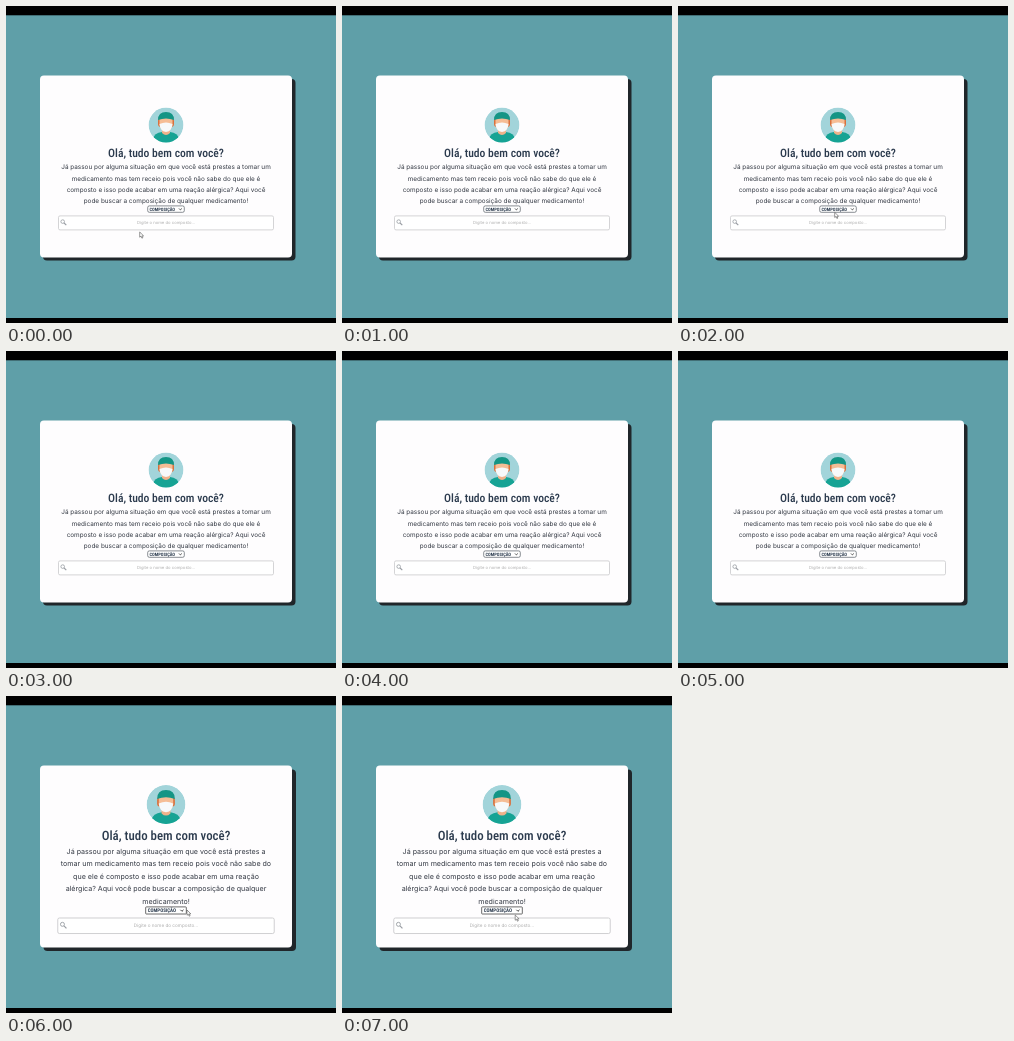
Animation, 330 px wide and 317 px high, one loop 8000 ms. Source, as an HTML page:

```html
<!DOCTYPE html>
<html lang="pt-BR">
<head>
<meta charset="utf-8">
<style>
  html, body { margin: 0; width: 100%; height: 100%; overflow: hidden; background: #000; }
  svg { display: block; width: 100vw; height: 100vh; }
  text { text-anchor: middle; text-rendering: geometricPrecision; font-family: Inter, sans-serif; }
  .title, .choice { font-family: "Roboto Condensed", Roboto, sans-serif; font-stretch: 75%; fill: #2c3b4e; }
  .title { font-size: 11.6px; font-weight: 500; }
  .choice { font-size: 4.5px; font-weight: 600; }
  .body { font-size: 6.4px; fill: #303640; }
  .hint { font-size: 4.2px; fill: #adadad; }
</style>
</head>
<body>
<svg viewBox="0 0 330 317">
  <defs>
    <clipPath id="disc"><circle r="17.5"/></clipPath>
    <g id="doctor" clip-path="url(#disc)">
      <circle r="17.5" fill="#a2d4da"/>
      <path d="M-13 18V14Q-12 8-4 7H4Q12 8 13 14V18Z" fill="#16a394"/>
      <path d="M-4 3H4V8Q0 12-4 8Z" fill="#efb28b"/>
      <rect x="-8" y="-7" width="16" height="9" rx="3" fill="#d9703c"/>
      <path d="M-6.5-7H6.5V0Q5 6.5 0 7Q-5 6.5-6.5 0Z" fill="#f5bd95"/>
      <path d="M-6.5-1Q0-4 6.5-1Q6 6 0 7Q-6 6-6.5-1Z" fill="#f7f9fa"/>
      <path d="M-8-5Q-8-13 0-13Q8-13 8-5Q0-8-8-5Z" fill="#149585"/>
    </g>
  </defs>
  <rect y="9.3" width="330" height="302.7" fill="#5f9fa8"/>
  <rect id="shadow" x="37" y="73" width="252.5" height="181.5" rx="4" fill="#20262a"/>
  <rect x="34" y="69.5" width="252" height="182" rx="4" fill="#fefdfe"/>
  <g id="small"></g>
  <g id="large"></g>
  <path id="cursor" d="M0 0V5.2L1.3 4.2L2.2 6.2L3.1 5.8L2.2 3.9H3.9Z" fill="#fff" stroke="#555" stroke-width=".6"/>
</svg>
<script>
const $ = id => document.getElementById(id);
const LOOP = 8000, ZOOM_AT = 5200, PITCH = 11.35;

// Content is laid out around x = 0, with the portrait's centre at y = 0.
function panel(lines, fieldWidth, radius, ink) {
  const selectY = 39.2 + lines.length * PITCH - 0.5;
  const fieldY = selectY + 13.8, left = -fieldWidth / 2;
  return `<use href="#doctor"/>
    <text class="title" y="31.6">Olá, tudo bem com você?</text>
    ${lines.map((line, i) => `<text class="body" y="${44.2 + i * PITCH}">${line}</text>`).join('')}
    <rect x="-18.3" y="${selectY - 3.2}" width="36.6" height="6.4" rx="${radius}"
      fill="#fff" stroke="${ink}" stroke-width=".65"/>
    <text class="choice" x="-3.7" y="${selectY + 1.6}">COMPOSIÇÃO</text>
    <path d="M13-.6l1.4 1.4l1.4-1.4" transform="translate(0 ${selectY})"
      fill="none" stroke="#222" stroke-width=".8"/>
    <rect x="${left}" y="${fieldY - 7}" width="${fieldWidth}" height="14" rx="1.5"
      fill="#fff" stroke="#c9c9cc" stroke-width=".8"/>
    <g transform="translate(${left + 4.2} ${fieldY - 1.3})" fill="none" stroke="#999da3">
      <circle r="1.8" stroke-width=".8"/><path d="M1.4 1.4L3.6 3.6" stroke-width="1.1"/>
    </g>
    <text class="hint" y="${fieldY + 1.5}">Digite o nome do composto...</text>`;
}

$('small').innerHTML = panel([
  'Já passou por alguma situação em que você está prestes a tomar um',
  'medicamento mas tem receio pois você não sabe do que ele é',
  'composto e isso pode acabar em uma reação alérgica? Aqui você',
  'pode buscar a composição de qualquer medicamento!'
], 215, 1.6, '#4b525a');
$('large').innerHTML = panel([
  'Já passou por alguma situação em que você está prestes a',
  'tomar um medicamento mas tem receio pois você não sabe do',
  'que ele é composto e isso pode acabar em uma reação',
  'alérgica? Aqui você pode buscar a composição de qualquer',
  'medicamento!'
], 195, 0.6, '#333');
$('small').setAttribute('transform', 'translate(160 119)');
$('large').setAttribute('transform', 'translate(160 108.5) scale(1.11)');

// The pointer jumps between captured positions: [start, x, y], or hidden.
const pointer = [
  [0, 133.7, 226], [600], [2000, 156.7, 206.3], [3000], [5200, 251, 210.3],
  [5800, 181, 214], [6200, 176.5, 216], [6600, 172.5, 217], [6800, 173.2, 219]
];

function draw(now) {
  const t = now % LOOP, zoomed = t >= ZOOM_AT;
  $('small').style.display = zoomed ? 'none' : '';
  $('large').style.display = zoomed ? '' : 'none';
  $('shadow').setAttribute('transform', zoomed ? 'translate(.5 .5)' : '');
  const [, x, y] = pointer.findLast(step => t >= step[0]);
  $('cursor').style.display = x === undefined ? 'none' : '';
  if (x !== undefined) $('cursor').setAttribute('transform', `translate(${x} ${y})`);
}

const start = performance.now();
function tick() {
  draw(performance.now() - start);
  requestAnimationFrame(tick);
}
tick();
</script>
</body>
</html>
```
